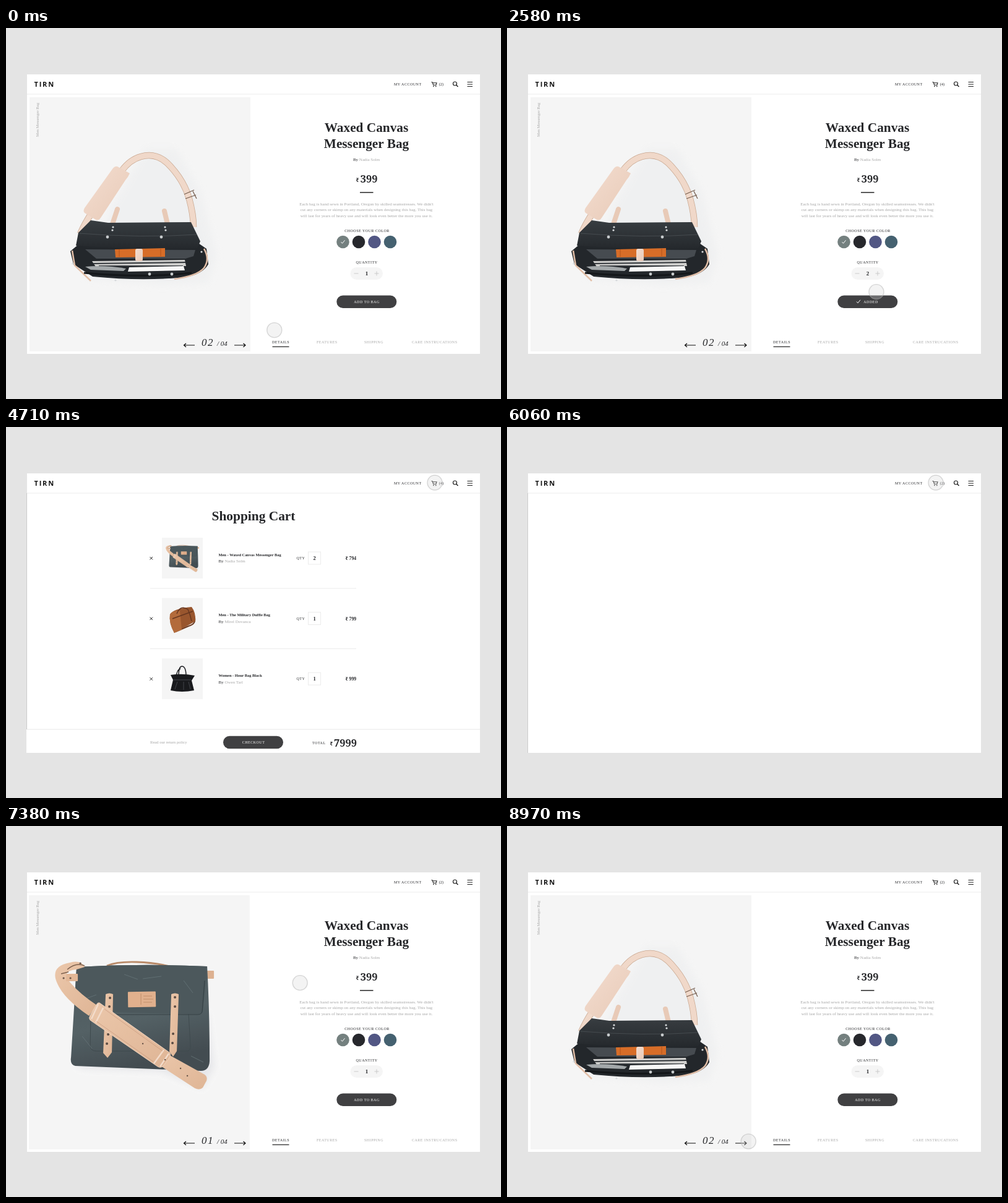
Write an HTML page that moves like this. It is 800 by 600 pixels and loops after 9000 ms.

```html
<!DOCTYPE html>
<html lang="en">
<head>
<meta charset="utf-8">
<title>Bag shop</title>
<style>
html, body { margin: 0; width: 100%; height: 100%; overflow: hidden; background: #e4e4e4 }
svg { display: block; width: 800px; height: 600px }
text { font-family: "Liberation Serif", "Noto Serif", serif; fill: #26272a }
.b { font-weight: bold }
.i { font-style: italic }
.c { text-anchor: middle }
.e { text-anchor: end }
.u { letter-spacing: .5px }
.g, .g text { fill: #a6a6a6 }
.w { fill: #fff }
.n { font-family: "Noto Serif", serif }
.ln { fill: none; stroke: #222; stroke-width: 1.2 }
.logo { font: bold 11px "Open Sans", sans-serif; letter-spacing: 1.8px; fill: #111 }
</style>
</head>
<body>
<svg id="stage" viewBox="0 0 800 600"></svg>
<script>
const LOOP = 9000;
const stage = document.getElementById('stage');

// Drawing helpers
const text = (x, y, size, str, cls = '', extra = '') =>
  `<text x="${x}" y="${y}" font-size="${size}" class="${cls}" ${extra}>${str}</text>`;
const rect = (x, y, w, h, fill, r = 0, extra = '') =>
  `<rect x="${x}" y="${y}" width="${w}" height="${h}" fill="${fill}" rx="${r}" ${extra}/>`;
const shape = (d, fill, extra = '') => `<path d="${d}" fill="${fill}" ${extra}/>`;
const line = (d, color = '#222', w = 1.2, extra = '') =>
  `<path d="${d}" class="ln" style="stroke:${color};stroke-width:${w}" ${extra}/>`;
const dots = (color, r, ...pts) =>
  pts.map(([x, y]) => `<circle cx="${x}" cy="${y}" r="${r}" fill="${color}"/>`).join('');
const group = (id, body) => `<g id="${id}">${body}</g>`;
const author = (x, y, name, cls = '') =>
  text(x, y, 7, `By <tspan class="g">${name}</tspan>`, cls);

const defs = `<defs>
  <filter id="soft" x="-30%" y="-30%" width="160%" height="160%"><feGaussianBlur stdDeviation="6"/></filter>
  <linearGradient id="canvas" x2=".3" y2="1"><stop stop-color="#4b575b"/><stop offset=".6" stop-color="#536064"/><stop offset="1" stop-color="#414b50"/></linearGradient>
  <linearGradient id="tan" x2="1" y2="1"><stop stop-color="#ebc7ab"/><stop offset="1" stop-color="#dfb594"/></linearGradient>
  <linearGradient id="pale" x2="1" y2="1"><stop stop-color="#f3ddd0"/><stop offset="1" stop-color="#e8cab7"/></linearGradient>
  <linearGradient id="dark" y2="1" x2="0"><stop stop-color="#383d41"/><stop offset="1" stop-color="#25292d"/></linearGradient>
</defs>`;

const frontBag =
  shape('M112 385L325 300L337 390L318 424L250 396L125 392Z', '#dcdde2', 'filter="url(#soft)" opacity=".6"') +
  line('M164 226Q180 219 212 220T274 229', '#b98a69', 3) +
  rect(324, 234, 13, 13, '#ddb190', 1) +
  shape('M115 228Q220 222 326 227Q330 300 330 380Q329 396 316 396L113 388Q104 386 106 374Z', 'url(#canvas)') +
  line('M138 304L137 356Q138 364 147 364H294Q299 364 299 356L296 304', '#3d494d', 1) +
  shape('M115 228Q220 222 326 227L319 299Q318 305 311 305L140 300L113 262Z', '#4a575b') +
  line('M322 250L318 300Q317 305 310 305H150', '#354145', 1.2) +
  line('M192 240l22 8M222 247l30 -4M125 281l22 -8M288 250l15 20M124 340l16 20M300 372l20 10', '#667478', .8) +
  rect(198, 268, 45, 25, '#e1b08c', 1, 'transform="rotate(-1 220 280)"') +
  line('M219 271v18M223 275h14M223 280h16M223 285h14', '#b98561', .8) +
  shape('M162 272q6 -3 12 0l-2 94l-7 9l-7 -8z', 'url(#tan)') +
  shape('M268 272q6 -3 12 0l-3 92l-6 9l-6 -8z', 'url(#tan)') +
  dots('#5a4a42', 2, [169, 278], [168, 292], [166, 337], [164, 352], [274, 277], [274, 292], [271, 336], [270, 351]) +
  shape('M128 228Q122 216 104 221Q76 226 81 247Q89 276 135 307L148 290Q116 269 99 246Q94 234 115 232Z', 'url(#tan)') +
  line('M100 232q14 -12 28 -6M90 239l12 -3', '#7d604d', 1.5) +
  rect(98, 239, 19, 12, '#e2b796', 1) +
  dots('#6a5548', 1.6, [105, 246], [94, 246], [121, 222]) +
  shape('M257 366L322 402Q327 406 325 412L319 423Q314 428 306 424L246 385Z', 'url(#tan)') +
  shape('M152 286L266 367Q268 371 264 376L255 388Q251 392 246 389L137 314Q134 311 137 306L147 289Q149 285 152 286Z',
    'url(#tan)', 'stroke="#f0d5c0"') +
  line('M150 288L139 312M158 294L146 318M256 362L240 384M264 368L250 389', '#f3dccb', 2.4) +
  line('M160 296L254 364M147 316L239 381', '#c6977a', .7) +
  dots('#6a5548', 1.2, [222, 352], [258, 378], [283, 392], [294, 404]);

const strap = 'M120 333Q134 300 164 266L187 231Q200 213 218 208Q245 200 266 224Q288 248 296 276Q303 302 303 322';
const openBag =
  shape('M225 195L275 195L316 268L340 370L326 412L250 415L130 405L170 290Z', '#eeeff0', 'filter="url(#soft)" opacity=".75"') +
  line(strap, '#c9a891', 10.5) + line(strap, '#f0d8c9', 9) +
  shape('M180 224L200 235Q197 242 193 246L153 307Q150 312 145 310L127 299Q124 296 127 291L172 228Q176 223 180 224Z', 'url(#pale)') +
  line('M288 269l16 -7M290 276l17 -6M302 264l6 12', '#765f50', 1.3) +
  line('M180 293L172 317M256 296L261 317', '#e8cab7', 8, 'stroke-linecap="round"') +
  shape('M104 361L122 346H308L324 357L327 382Q318 398 290 403Q220 410 140 402L109 382Z', '#23272b') +
  line('M107 360L111 384L137 409M320 357Q330 374 320 388Q309 401 272 406', '#e2bfa8', 2.5) +
  shape('M137 311L165 315L299 314L314 345L309 356Q210 358 113 352L117 331Z', 'url(#dark)') +
  line('M118 332Q220 340 308 334', '#4c5256', .8) +
  shape('M128 358L306 359L303 369L290 373H146Z', '#464b50') +
  shape('M176 358L257 356V370L177 371Z', '#d76d28') +
  line('M183 358v12M250 357v12', '#b4541a', 1) +
  shape('M139 377L289 375L291 385L145 386Z', '#d0d0ce') +
  line('M141 381L290 379M150 385H286', '#34383c', 2) +
  shape('M199 387L287 385L289 392L197 394Z', '#f8f8f7') +
  shape('M128 386Q160 383 194 389L190 393L137 391Z', '#a3a8aa') +
  line('M126 396Q220 405 300 396', '#14171a', 3) +
  rect(209, 357, 12, 20, 'url(#pale)', 3) +
  dots('#c7cbcd', 2.4, [164, 338], [251, 338], [232, 398], [268, 398]) +
  dots('#d9dcde', 1.6, [173, 322], [172, 327], [257, 322], [258, 327], [108, 381], [177, 408], [316, 362]);

const duffle =
  line('M304 306Q309 318 295 322L274 331', '#6b3a21', 2) +
  shape('M265 303Q270 294 300 291Q307 300 306 314Q296 320 272 333Q263 317 265 303Z', '#99562e') +
  shape('M265 303Q270 296 281 297L284 328L272 333Q263 317 265 303Z', '#b36b3b') +
  line('M276 302Q282 287 294 295Q298 304 300 314M269 310L302 298', '#66361f', 1.4);
const handbag =
  line('M279 403Q279 386 285 387Q291 388 291 403M275 405Q276 392 282 391', '#202124', 1.6) +
  shape('M266 401Q285 398 305 402L300 410L304 426Q284 430 266 426L270 409Z', '#191a1d') +
  line('M271 409H299M277 412L273 424M287 412V425M295 412L298 424', '#43454a', 1);

const button = (x, y, body) => rect(x, y, 97, 20.5, '#404042', 10.25) + body;
const check = (x, y) => line(`M${x - 3} ${y}l2 2.3l4 -5`, '#fff', 1);

const page =
  group('bg', rect(38, 112, 357, 411, '#f5f5f5')) +
  group('photo', group('bag1', `<g id="front">${frontBag}</g>`) + group('bag2', openBag)) +
  group('label', text(0, 0, 6.65, 'Men Messenger Bag', 'c g', 'transform="translate(53 148.5) rotate(-90)"')) +
  group('pager',
    line('M305 513H287.5M291 510l-3.5 3l3.5 3M369 513h18M383.5 510l3.5 3l-3.5 3', '#111') +
    text(326, 514, 17, '02', 'c i', 'id="num" letter-spacing="1.5"') + text(341, 514, 11, '/ 04', 'i')) +
  group('head', text(582.5, 168, 21.3, 'Waxed Canvas', 'b c') + text(582.5, 194, 21.3, 'Messenger Bag', 'b c')) +
  group('by', author(582.5, 214.5, 'Nadia Solm', 'c')) +
  group('price', text(565.5, 248.5, 9, '₹', 'b') + text(600.5, 250, 16.5, '399', 'b e n') + line('M572 266H593.5', '#222', 1.5)) +
  group('about', [
    'Each bag is hand sewn in Portland, Oregon by skilled seamstresses. We didn\'t',
    'cut any corners or skimp on any materials when designing this bag. This bag',
    'will last for years of heavy use and will look even better the more you use it.'
  ].map((s, i) => text(582.5, 286.5 + 9.5 * i, 6.97, s, 'c g')).join('')) +
  group('colors', text(583.5, 330, 6, 'CHOOSE YOUR COLOR', 'c u') +
    ['#74807f', '#27282d', '#525784', '#456170'].map((c, i) => dots(c, 10.3, [544.5 + 25.5 * i, 346])).join('') + check(544.5, 346)) +
  group('qty', text(583, 381, 6, 'QUANTITY', 'c u')) +
  group('pill', rect(556.5, 387, 52.5, 20, '#f5f5f5', 10) +
    line('M562.5 397h7M595.5 397h7M599 393.5v7', '#c6c6c6', .9) + text(583, 400, 9, '1', 'b c', 'id="count"')) +
  group('buy', button(534.3, 432.4, '<g id="add">' + text(583, 444.7, 6, 'ADD TO BAG', 'c u w') + '</g>' +
    '<g id="added">' + check(568, 442.5) + text(588, 444.7, 6, 'ADDED', 'c u w') + '</g>')) +
  group('tabs', text(430, 510, 6, 'DETAILS', 'u') + line('M430.5 515.5H457.5') +
    [[502, 'FEATURES'], [579, 'SHIPPING'], [656, 'CARE INSTRUCATIONS']].map(([x, s]) => text(x, 510, 6, s, 'u g')).join(''));

const item = (i, name, maker, qty, cost, art) => {
  const y = 212 + 97.6 * i;
  return group('row' + i,
    line(`M232.5 ${y - 2}l4.5 4.5m0 -4.5l-4.5 4.5`, '#222', 1) +
    rect(252, y - 33, 66, 66, '#f5f5f5') + art +
    text(343.5, y - 3.5, 6.4, name, 'b') + author(343.5, y + 7.3, maker) +
    text(469.5, y + 2, 6, 'QTY', 'u') + rect(488.5, y - 10, 20, 20, '#fff', 0, 'stroke="#ececec"') +
    text(498.5, y + 3, 8.5, qty, 'b c') + text(566, y + 3, 7.6, '₹ ' + cost, 'b e') +
    (i < 2 ? line(`M233 ${y + 49}H566`, '#ebebeb', 1) : ''));
};
const cart =
  group('title', text(400, 150.5, 21.4, 'Shopping Cart', 'b c')) +
  item(0, 'Men - Waxed Canvas Messenger Bag', 'Nadia Solm', 2, 794,
    '<use href="#front" transform="translate(241.2 145) scale(.21)"/>') +
  item(1, 'Men - The Military Duffle Bag', 'Mirel Dovanca', 1, 799, duffle) +
  item(2, 'Women - Hour Bag Black', 'Owen Tarl', 1, 999, handbag) +
  group('bar', rect(33, 489, 733, 38, '#fff') + line('M34 489H766', '#e8e8e8', 1) +
    text(233, 512, 6.6, 'Read our return policy', 'g') +
    button(351, 499.8, text(400, 512, 6, 'CHECKOUT', 'c u w')) +
    text(495, 513, 6, 'TOTAL', 'u') + text(523.5, 515, 8.5, '₹', 'b') + text(567, 517, 16.5, '7999', 'b e n'));

const header =
  line('M34 107H766', '#ececec', 1) + text(45.5, 95, 11, 'TIRN', 'logo') + text(627, 93.3, 6, 'MY ACCOUNT', 'u') +
  line('M687.5 87.5h1.5l1.7 4.7h4.3l1 -3.5h-6', '#222', 1.1) + dots('#222', .9, [691, 94.3], [694.7, 94.3]) +
  text(703.5, 93, 6.5, '(2)', 'c', 'id="badge"') +
  '<circle cx="725.5" cy="90" r="3" class="ln"/>' + line('M727.7 92.2L730.5 95', '#222', 1.5) +
  line('M745.5 87.5h8.5m-8.5 3.5h8.5m-8.5 3.5h8.5');

stage.innerHTML = defs + rect(34, 75, 732, 452, '#fff') +
  '<clipPath id="panel"><rect x="33" y="75" width="733" height="452"/></clipPath>' +
  line('M33.5 107V527', '#cbcbcb', 1, 'id="edge"') +
  `<g clip-path="url(#panel)">${page + cart}</g>` + header +
  '<g id="cursor"><circle r="12" fill="#d7d7d7" fill-opacity=".3" stroke="#b4b4b4" stroke-opacity=".5" stroke-width="1.4"/></g>';

const $ = {};
stage.querySelectorAll('[id]').forEach(el => $[el.id] = el);

// Motion helpers
const clamp = x => Math.max(0, Math.min(1, x));
const span = (t, start, dur) => clamp((t - start) / dur);
const smooth = x => x * x * (3 - 2 * x);
const inOut = x => x < .5 ? 4 * x ** 3 : 1 - 4 * (1 - x) ** 3;
const mix = (a, b, k) => a.map((v, i) => v + (b[i] - v) * k);
const fade = (el, k) => el.setAttribute('opacity', k.toFixed(3));

// id: [dx, dy while hidden, entry start, entry duration]
const pageParts = {
  bg: [-40, 0, 6900, 535], photo: [-80, 0, 6608, 825], label: [-15, 0, 6700, 640], pager: [0, 22, 6605, 660],
  head: [0, -10, 6944, 360], by: [0, -10, 6980, 360], price: [0, -10.5, 6935, 360], about: [0, -10, 7015, 360],
  colors: [0, -11, 6890, 360], qty: [0, -10, 6955, 360], pill: [0, -10, 6982, 360], buy: [0, -10, 6950, 360],
  tabs: [0, 10, 7018, 360]
};
const cartParts = {
  title: [0, -10, 3930, 300], row0: [0, -12, 4130, 350], row1: [0, -12, 4210, 350],
  row2: [0, -12, 4290, 350], bar: [0, 20, 4280, 350]
};

function pose(id, [dx, dy], k) {
  fade($[id], k);
  $[id].setAttribute('transform', `translate(${dx * (1 - k)} ${dy * (1 - k)})`);
}

const PLUS = [597, 397], BUY = [592, 444], CART = [693, 90], NEXT = [378, 512];
function cursorAt(t) {
  if (t < 1250) return mix([433, 489], PLUS, 1 - (1 - span(t, 0, 650)) ** 3);
  if (t < 2385) return mix(PLUS, BUY, inOut(span(t, 1250, 450)));
  if (t < 6600) return mix(BUY, CART, inOut(span(t, 2385, 850)));
  if (t < 8880) {
    const s = span(t, 6600, 1360), bend = [460, 140];
    return mix(mix(CART, bend, s), mix(bend, NEXT, s), s);
  }
  return mix(NEXT, [597, 478], .054 * ((t - 8880) / 90) ** 3);
}

function draw(t) {
  for (const id in pageParts) {
    const p = pageParts[id];
    pose(id, p, t < 6000 ? 1 - smooth(span(t, 3750, 270)) : smooth(span(t, p[2], p[3])));
  }
  Object.entries(cartParts).forEach(([id, p], i) =>
    pose(id, p, smooth(span(t, p[2], p[3])) * (1 - smooth(span(t, 5400 + 70 * i, 380)))));

  const second = t < 6000 || t > 8450;
  fade($.bag1, t < 6000 ? 0 : 1 - smooth(span(t, 8200, 420)));
  fade($.bag2, t < 6000 ? 1 : smooth(span(t, 8380, 420)));
  $.num.textContent = second ? '02' : '01';
  $.count.textContent = t > 1100 && t < 6000 ? 2 : 1;
  $.badge.textContent = t > 2150 && t < 6000 ? '(4)' : '(2)';
  const done = smooth(span(t, 1900, 180)) * (1 - smooth(span(t, 3300, 180)));
  fade($.add, 1 - done);
  fade($.added, done);
  fade($.edge, t > 3840 && t < 7250 ? 1 : 0);

  const press = [1080, 1850, 3680, 5400, 8130]
    .reduce((s, c) => s + Math.sin(Math.PI * span(t, c - 100, 200)), 0);
  const [x, y] = cursorAt(t);
  $.cursor.setAttribute('transform', `translate(${x} ${y}) scale(${1 - .15 * press})`);
}

const begin = performance.now();
function tick() {
  draw((performance.now() - begin) % LOOP);
  requestAnimationFrame(tick);
}
tick();
</script>
</body>
</html>
```
